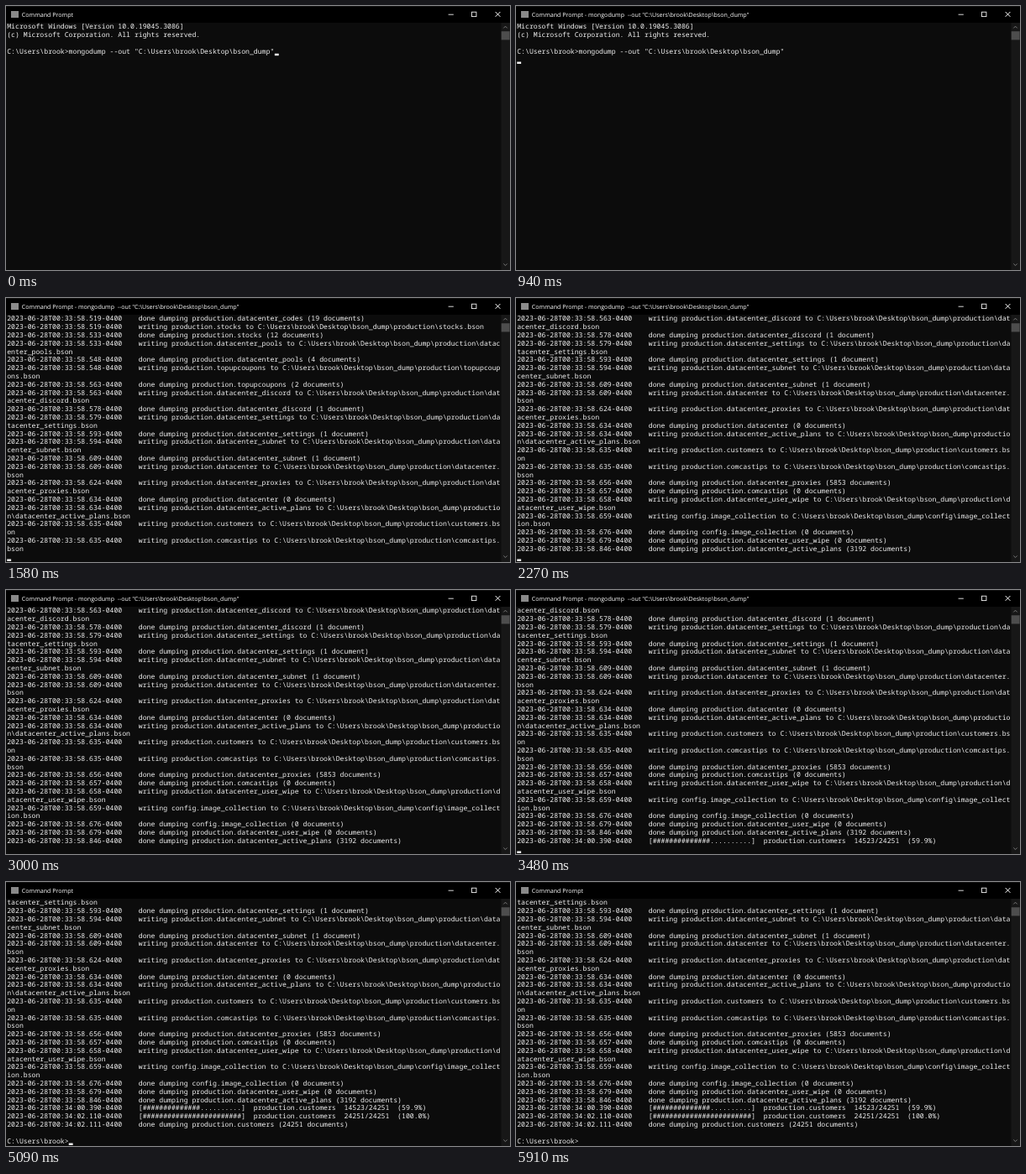
Animation, 600 px wide and 315 px high, one loop 5940 ms. Source, as an HTML page with a canvas:

```html
<!DOCTYPE html>
<html lang="en">
<head>
<meta charset="utf-8">
<title>Command Prompt</title>
<style>
  html, body { margin: 0; width: 100%; height: 100%; overflow: hidden; background: #0c0c0c; }
  canvas { display: block; width: 600px; height: 315px; }
</style>
</head>
<body>
<canvas id="stage"></canvas>
<script>
const W = 600, H = 315, LOOP = 5940;
const COLS = 120, ROWS = 30, CELL_W = 4.902, CELL_H = 9.8, LEFT = 1.2, TOP = 20;
const HOME = 'C:\\Users\\brook';
const OUT = HOME + '\\Desktop\\bson_dump';
const ENTER = 240, LOG_START = 944, PROMPT_BACK = 5070;
const BLINK = 530, BLINK_PHASE = 60;

const canvas = document.getElementById('stage');
const ctx = canvas.getContext('2d');
const dpr = window.devicePixelRatio || 1;
canvas.width = W * dpr;
canvas.height = H * dpr;

// Each event appends text to the console at a time in ms.
const events = [{
  t: -10,
  text: 'Microsoft Windows [Version 10.0.19045.3086]\n' +
        '(c) Microsoft Corporation. All rights reserved.\n\n' +
        HOME + '>mongodump --out "' + OUT + '"'
}, { t: ENTER, text: '\n' }];

// ms counts from 00:33:58.000
function log(ms, message) {
  const pad = (n, len) => String(n).padStart(len, '0');
  const sec = 58 + Math.floor(ms / 1000);
  const clock = `${33 + Math.floor(sec / 60)}:${pad(sec % 60, 2)}.${pad(ms % 1000, 3)}`;
  events.push({ t: LOG_START + ms, text: `2023-06-28T00:${clock}-0400    ${message}\n` });
}

function writing(ms, name, db = 'production') {
  log(ms, `writing ${db}.${name} to ${OUT}\\${db}\\${name}.bson`);
}

function done(ms, name, count, db = 'production') {
  log(ms, `done dumping ${db}.${name} (${count} document${count === 1 ? '' : 's'})`);
}

function progress(ms, count, total) {
  const share = count / total;
  const bar = '#'.repeat(Math.floor(share * 24)).padEnd(24, '.');
  log(ms, `[${bar}]  production.customers  ${count}/${total}  (${(share * 100).toFixed(1)}%)`);
}

writing(281, 'system.users', 'admin');
done(297, 'system.users', 6, 'admin');
writing(297, 'system.roles', 'admin');
done(309, 'system.roles', 1, 'admin');
writing(309, 'system.version', 'admin');
done(321, 'system.version', 2, 'admin');
writing(321, 'sessions');
done(435, 'sessions', 40893);
writing(435, 'datacenter_customers');
done(455, 'datacenter_customers', 2731);
writing(456, 'success_rewards_user_lists');
done(472, 'success_rewards_user_lists', 1199);
writing(473, 'passwordresets');
done(490, 'passwordresets', 664);
writing(490, 'coupons');
done(508, 'coupons', 17);
writing(508, 'datacenter_codes');
done(519, 'datacenter_codes', 19);
writing(519, 'stocks');
done(533, 'stocks', 12);
writing(533, 'datacenter_pools');
done(548, 'datacenter_pools', 4);
writing(548, 'topupcoupons');
done(563, 'topupcoupons', 2);
writing(563, 'datacenter_discord');
done(578, 'datacenter_discord', 1);
writing(579, 'datacenter_settings');
done(593, 'datacenter_settings', 1);
writing(594, 'datacenter_subnet');
done(609, 'datacenter_subnet', 1);
writing(609, 'datacenter');
writing(624, 'datacenter_proxies');
done(634, 'datacenter', 0);
writing(634, 'datacenter_active_plans');
writing(635, 'customers');
writing(635, 'comcastips');
done(656, 'datacenter_proxies', 5853);
done(657, 'comcastips', 0);
writing(658, 'datacenter_user_wipe');
writing(659, 'image_collection', 'config');
done(676, 'image_collection', 0, 'config');
done(679, 'datacenter_user_wipe', 0);
done(846, 'datacenter_active_plans', 3192);
progress(2390, 14523, 24251);
progress(4110, 24251, 24251);
done(4111, 'customers', 24251);
events.push({ t: PROMPT_BACK, text: '\n' + HOME + '>' });

// Wrap at the last column; a full line leaves an empty row behind it.
function wrap(line) {
  const rows = [];
  while (line.length >= COLS) {
    rows.push(line.slice(0, COLS));
    line = line.slice(COLS);
  }
  rows.push(line);
  return rows;
}

// The first blink tick after any output is skipped.
function cursorOn(t, lastWrite) {
  const tick = time => Math.floor((time - BLINK_PHASE) / BLINK);
  const n = tick(t) - tick(lastWrite);
  return n < 2 || n % 2 === 1;
}

function rect(color, x, y, w, h) {
  ctx.fillStyle = color;
  ctx.fillRect(x, y, w, h);
}

function stroke(color, width, points) {
  ctx.strokeStyle = color;
  ctx.lineWidth = width;
  ctx.beginPath();
  points.forEach(([x, y], i) => i ? ctx.lineTo(x, y) : ctx.moveTo(x, y));
  ctx.stroke();
}

function drawTitleBar(t) {
  rect('#000', 0, 0, W, TOP);
  rect('#1e1e1e', 0, 0, W, 0.6);
  rect('#8a8a8a', 6, 6, 9, 8);

  const running = t >= ENTER && t < PROMPT_BACK;
  ctx.font = '7.1px "Open Sans", "Noto Sans", sans-serif';
  ctx.fillStyle = '#fff';
  ctx.fillText('Command Prompt' + (running ? ` - mongodump  --out "${OUT}"` : ''), 18.8, 12.7);

  stroke('#f2f2f2', 0.9, [[526.6, 10.2], [532.8, 10.2]]);
  ctx.strokeRect(554.5, 7.2, 5.4, 5.4);
  stroke('#fff', 1, [[582.6, 7], [588.4, 12.8]]);
  stroke('#fff', 1, [[588.4, 7], [582.6, 12.8]]);
}

function drawScrollbar() {
  rect('#171717', 589.4, TOP, 10.6, H - TOP);
  rect('#4d4d4d', 589.7, 30.2, 9.9, 10.2);
  stroke('#7a7a7a', 1, [[592.3, 26.4], [594.5, 24.2], [596.7, 26.4]]);
  stroke('#7a7a7a', 1, [[592.3, 307.5], [594.5, 309.7], [596.7, 307.5]]);
}

function drawConsole(t) {
  const shown = events.filter(e => e.t <= t);
  const text = shown.map(e => e.text).join('');
  const rows = text.split('\n').flatMap(wrap).slice(-ROWS);

  ctx.font = `${CELL_W / 0.6}px "Noto Sans Mono", "DejaVu Sans Mono", monospace`;
  ctx.fillStyle = '#f0f0f0';
  rows.forEach((row, i) => ctx.fillText(row, LEFT, TOP + i * CELL_H + 7.4));

  if (cursorOn(t, shown[shown.length - 1].t)) {
    const last = rows.length - 1;
    rect('#f2f2f2', LEFT + rows[last].length * CELL_W, TOP + last * CELL_H + 7.35, CELL_W, 2.45);
  }
}

function draw(t) {
  ctx.setTransform(dpr, 0, 0, dpr, 0, 0);
  ctx.textRendering = 'geometricPrecision';
  rect('#0c0c0c', 0, 0, W, H);
  drawConsole(t);
  drawScrollbar();
  drawTitleBar(t);
}

const start = performance.now();
function frame() {
  draw((performance.now() - start) % LOOP);
  requestAnimationFrame(frame);
}
frame();
</script>
</body>
</html>
```
